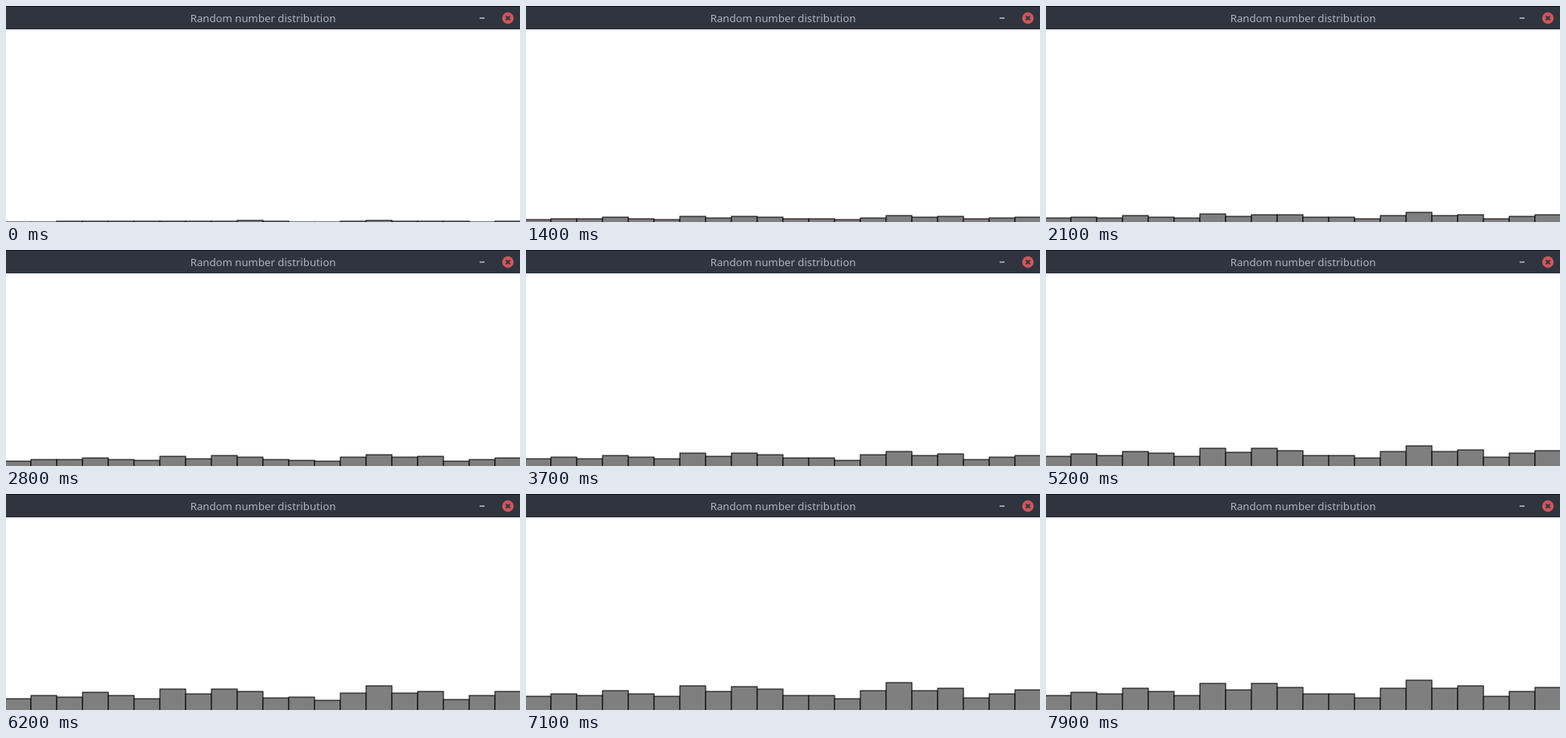
Write an HTML page with a canvas that moves like this. It is 638x268 px and loops after 8 s.

```html
<!DOCTYPE html>
<html>
<head>
<meta charset="utf-8">
<style>
html, body { margin: 0; width: 100%; height: 100%; overflow: hidden; background: #fff; }
canvas { display: block; }
</style>
</head>
<body>
<canvas id="stage" width="638" height="268"></canvas>
<script>
const ctx = document.getElementById('stage').getContext('2d');
const LOOP = 8000, STEP = 100;
const BASE = 269, PITCH = 32;
const FIRST_HITS = 37, HITS_PER_STEP = 6;

// Hits each bar has collected when the loop ends
const totals = [19, 23, 21, 28, 24, 19, 34, 26, 34, 29, 21, 21, 16, 28, 38, 28, 31, 18, 24, 29];

let seed = 7;
function random() {
  seed = (seed * 16807) % 2147483647;
  return seed / 2147483647;
}

// Each bar's hits fall at jittered, evenly spread moments; together they form one sequence
const hits = totals
  .flatMap((n, bar) => Array.from({ length: n }, (_, j) => ({ bar, at: (j + random()) / n })))
  .sort((a, b) => a.at - b.at);

function rect(color, x, y, w, h) {
  ctx.fillStyle = color;
  ctx.fillRect(x, y, w, h);
}

function drawBars(step) {
  const counts = totals.map(() => 0);
  for (const hit of hits.slice(0, FIRST_HITS + HITS_PER_STEP * step)) counts[hit.bar]++;
  ctx.strokeStyle = '#000';
  ctx.lineWidth = 1;
  counts.forEach((count, i) => {
    const box = [i * PITCH - 1, BASE - count, PITCH, count];
    rect('#7f7f7f', ...box);
    ctx.strokeRect(...box);
  });
}

function drawTitleBar() {
  rect('#2f343f', 0, 0, 638, 29);
  rect('#0c101b', 0, 0, 638, 1);
  ctx.fillStyle = '#afb4bf';
  ctx.font = '13.2px "Noto Sans", "Open Sans", sans-serif';
  ctx.textAlign = 'center';
  ctx.fillText('Random number distribution', 319, 20);
  rect('#9499a4', 588, 14, 6, 2);
  ctx.fillStyle = '#cc575d';
  ctx.beginPath();
  ctx.arc(623, 15, 7.2, 0, 2 * Math.PI);
  ctx.fill();
  ctx.strokeStyle = '#2f343f';
  ctx.lineWidth = 1.8;
  ctx.beginPath();
  for (const d of [-2.5, 2.5]) {
    ctx.moveTo(623 - d, 12.5);
    ctx.lineTo(623 + d, 17.5);
  }
  ctx.stroke();
}

function frame() {
  rect('#fff', 0, 0, 638, 268);
  drawBars(Math.floor(performance.now() % LOOP / STEP));
  drawTitleBar();
  requestAnimationFrame(frame);
}
frame();
</script>
</body>
</html>
```
